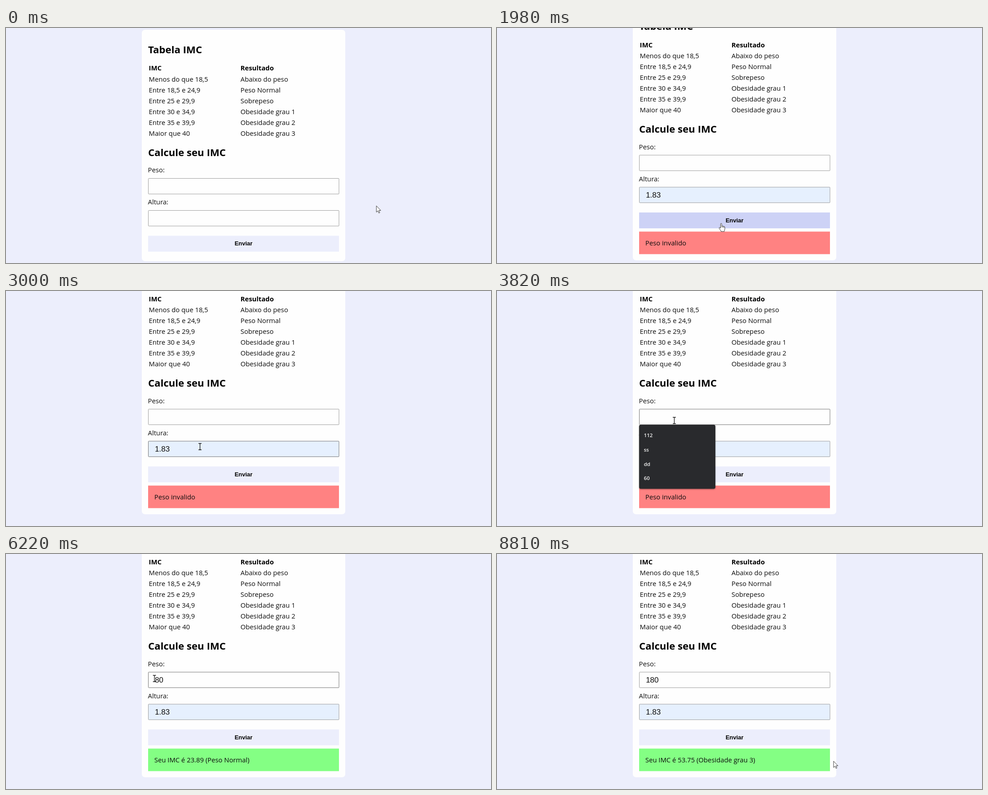
These frames come from a looping animation (1075 px wide and 521 px high, 8880 ms). An HTML page:

```html
<!DOCTYPE html>
<html lang="pt">
<head>
<meta charset="utf-8">
<title>Tabela IMC</title>
<style>
  html, body { margin: 0; width: 100%; height: 100%; overflow: hidden; background: #eceefc; }
  svg { display: block; width: 1075px; height: 521px; }
  text { font: 14.75px "Open Sans", "Noto Sans", sans-serif; fill: #0c0c0c; white-space: pre; }
  .title { font-size: 22.1px; font-weight: 700; fill: #000; }
  .head { font-weight: 700; fill: #000; }
  .value { font: 17px "Liberation Sans", Arial, sans-serif; }
  .button { font: 700 13px "Liberation Sans", Arial, sans-serif; fill: #000; text-anchor: middle; }
  .option { font-size: 11.5px; font-weight: 600; fill: #f1f1f1; }
  .menu { filter: drop-shadow(0 1px 1.5px rgba(0, 0, 0, .4)); }
</style>
</head>
<body>
<svg id="stage" viewBox="0 0 1075 521"></svg>
<script>
const LOOP = 8880;
const stage = document.getElementById('stage');

function add(parent, tag, attrs, content) {
  const node = document.createElementNS('http://www.w3.org/2000/svg', tag);
  set(node, attrs);
  if (content !== undefined) node.textContent = content;
  parent.appendChild(node);
  return node;
}
function set(node, attrs) {
  for (const key in attrs) node.setAttribute(key, attrs[key]);
}
function show(node, visible) {
  node.setAttribute('visibility', visible ? 'visible' : 'hidden');
}
function label(x, y, content, cls = '') {
  return add(page, 'text', { x, y, class: cls }, content);
}
function box(x, y, width, height, fill, parent = page) {
  return add(parent, 'rect', { x, y, width, height, fill });
}

add(stage, 'rect', { width: 1075, height: 521, fill: '#eceefc' });
const page = add(stage, 'g', {});
const card = box(301, 4, 451, 513, '#fefefe');
card.setAttribute('rx', 7);

label(315, 55.5, 'Tabela IMC', 'title');
[
  ['IMC', 'Resultado'],
  ['Menos do que 18,5', 'Abaixo do peso'],
  ['Entre 18,5 e 24,9', 'Peso Normal'],
  ['Entre 25 e 29,9', 'Sobrepeso'],
  ['Entre 30 e 34,9', 'Obesidade grau 1'],
  ['Entre 35 e 39,9', 'Obesidade grau 2'],
  ['Maior que 40', 'Obesidade grau 3']
].forEach(([range, result], i) => {
  const y = 94.4 + i * 24.1, cls = i ? '' : 'head';
  label(316.6, y, range, cls);
  label(519.8, y, result, cls);
});
label(315, 283.5, 'Calcule seu IMC', 'title');

function makeField(name, top) {
  label(314.6, top - 12.6, name);
  const frame = box(315.5, top + .5, 422.5, 34.5, '#fefefe');
  set(frame, { rx: 1, 'stroke-width': 1 });
  return {
    top, frame,
    value: label(329.9, top + 24, '', 'value'),
    caret: box(330, top + 8, 1, 19, '#222')
  };
}
const weight = makeField('Peso:', 333);
const height = makeField('Altura:', 404);

const button = box(315, 460.6, 423, 35.2, '#eceefc');
label(526.5, 482.4, 'Enviar', 'button');
const messageBox = box(315, 503, 423, 50, '#ff8282');
const messageText = label(328.8, 533.4, '');

function makeMenu(top, options) {
  const group = add(page, 'g', { class: 'menu' });
  set(box(315, top, 169, 142, '#292a2d', group), { rx: 4 });
  const highlight = box(315, top + 8, 169, 31.6, '#3f4043', group);
  options.forEach((option, i) =>
    add(group, 'text', { x: 325.4, y: top + 28 + i * 31.6, class: 'option' }, option));
  return { group, top, highlight };
}
const heightMenu = makeMenu(439.5, ['1.83', '1.70', '1.65', '1.60']);
const weightMenu = makeMenu(368, ['112', 'ss', 'dd', '60']);

// Cursor shapes, each with its hot spot at the origin
const outline = { fill: '#fff', stroke: '#222', 'stroke-width': .9, 'stroke-linejoin': 'round' };
const cursors = {
  arrow: add(stage, 'path', { ...outline,
    d: 'M0 .3V14.3L3.2 11.4 5.4 16.3 7.5 15.4 5.4 10.6H9.8Z' }),
  hand: add(stage, 'path', { ...outline,
    d: 'M-1.5 11V1.7C-1.5-.2 1.2-.2 1.2 1.7V6.4C1.5 5.2 3.6 5.5 3.7 7 4.2 5.9 6 6.4 6 7.7 6.6 6.8 8 7.3 8 8.8V12.7C8 15 6.8 16 6.6 18.3H-.3C-.5 16.2-3 14.3-4.4 11.4-5.4 9.2-3 8.6-1.5 11ZM1.2 6.4V9.3M3.7 7V9.6M6 7.7V9.9' }),
  text: add(stage, 'path', { fill: 'none', stroke: '#111', 'stroke-width': 1.3,
    d: 'M-3.3-7H-1Q0-7 0-6 0-7 1-7H3.3M0-6V6M-3.3 7H-1Q0 7 0 6 0 7 1 7H3.3' })
};

// time, x, y
const path = [
  [0, 821, 394], [70, 800, 398], [270, 420, 424], [530, 420, 426],
  [700, 238, 456], [950, 340, 463], [1080, 349, 463], [1150, 349, 463],
  [1350, 497, 478], [1740, 497, 478], [2130, 497, 411], [2370, 497, 411],
  [2700, 470, 385], [3000, 430, 345], [3250, 400, 310], [3320, 393, 287],
  [4450, 393, 287], [4600, 420, 346], [4790, 420, 346], [4930, 854, 441],
  [5060, 594, 396], [5200, 594, 396], [5270, 505, 418], [5450, 505, 418],
  [5700, 430, 345], [5940, 329, 276], [6420, 329, 276], [6690, 499, 278],
  [7720, 499, 278], [8130, 508, 415], [8660, 508, 415], [8810, 746, 459],
  [LOOP, 746, 459]
];
function cursorAt(t) {
  const next = Math.max(1, path.findIndex(p => p[0] > t));
  const [t0, x0, y0] = path[next - 1], [t1, x1, y1] = path[next];
  const k = (t - t0) / (t1 - t0), ease = k * k * (3 - 2 * k);
  return { x: x0 + (x1 - x0) * ease, y: y0 + (y1 - y0) * ease };
}

const within = (t, from, to) => t >= from && t < to;
// Latest entry whose start time has passed
const latest = (t, list) => list.filter(entry => t >= entry[0]).pop();

function drawField(field, t, { value, focused, hovered, fill, caretX, blinkStart }) {
  set(field.frame, { fill, stroke: focused || hovered ? '#747474' : '#9c9c9c' });
  field.value.textContent = value;
  field.caret.setAttribute('x', caretX);
  show(field.caret, focused && Math.floor((t - blinkStart) / 530) % 2 === 0);
}

function render(t) {
  const scrollPart = Math.min(1, Math.max(0, (t - 1740) / 470));
  const scroll = 71.6 * Math.sin(scrollPart * Math.PI / 2);
  page.setAttribute('transform', `translate(0 ${-scroll})`);

  const heightOpen = within(t, 270, 1080), weightOpen = within(t, 3390, 4060);
  show(heightMenu.group, heightOpen);
  show(weightMenu.group, weightOpen);

  const { x, y } = cursorAt(t), pageY = y + scroll;
  const onMenu = menu => x > 315 && x < 484 && pageY > menu.top && pageY < menu.top + 142;
  const covered = heightOpen && onMenu(heightMenu) || weightOpen && onMenu(weightMenu);
  const over = (top, size) => !covered && x > 315 && x < 738 && pageY >= top && pageY < top + size;
  const picking = heightOpen && onMenu(heightMenu);
  show(heightMenu.highlight, picking);
  show(weightMenu.highlight, false);

  const onButton = over(460, 36);
  const onWeight = over(333, 36), onHeight = over(404, 36);
  button.setAttribute('fill', onButton && t > 1200 ? '#cdd2f6' : '#eceefc');

  const [typedAt, weightValue, caretX] = latest(t, [
    [0, '', 330], [3290, '', 330], [4060, '8', 339.4], [4260, '80', 348.8],
    [6430, '80', 330], [7280, '180', 339.4]
  ]);
  drawField(weight, t, {
    value: weightValue, caretX, blinkStart: typedAt, hovered: onWeight, fill: '#fefefe',
    focused: within(t, 3320, 5260) || within(t, 6220, 8270)
  });
  const filled = picking || t >= 1080;
  drawField(height, t, {
    value: filled ? '1.83' : '', caretX: t < 1080 ? 330 : 362.6,
    blinkStart: t < 1080 ? 270 : 1080, hovered: onHeight,
    fill: filled ? '#e6f0fe' : '#fefefe', focused: within(t, 270, 1420)
  });

  const [, message, color] = latest(t, [
    [0, '', ''], [1420, 'Peso invalido', '#ff8282'],
    [5260, 'Seu IMC é 23.89 (Peso Normal)', '#84ff84'],
    [8270, 'Seu IMC é 53.75 (Obesidade grau 3)', '#84ff84']
  ]);
  show(messageBox, message);
  if (message) messageBox.setAttribute('fill', color);
  messageText.textContent = message;
  card.setAttribute('height', message ? 562.6 : 513);

  const kind = onButton ? 'hand' : onWeight || onHeight ? 'text' : 'arrow';
  for (const name in cursors) show(cursors[name], name === kind);
  cursors[kind].setAttribute('transform', `translate(${x} ${y})`);
}

const start = performance.now();
function tick() {
  render((performance.now() - start) % LOOP);
  requestAnimationFrame(tick);
}
tick();
</script>
</body>
</html>
```
